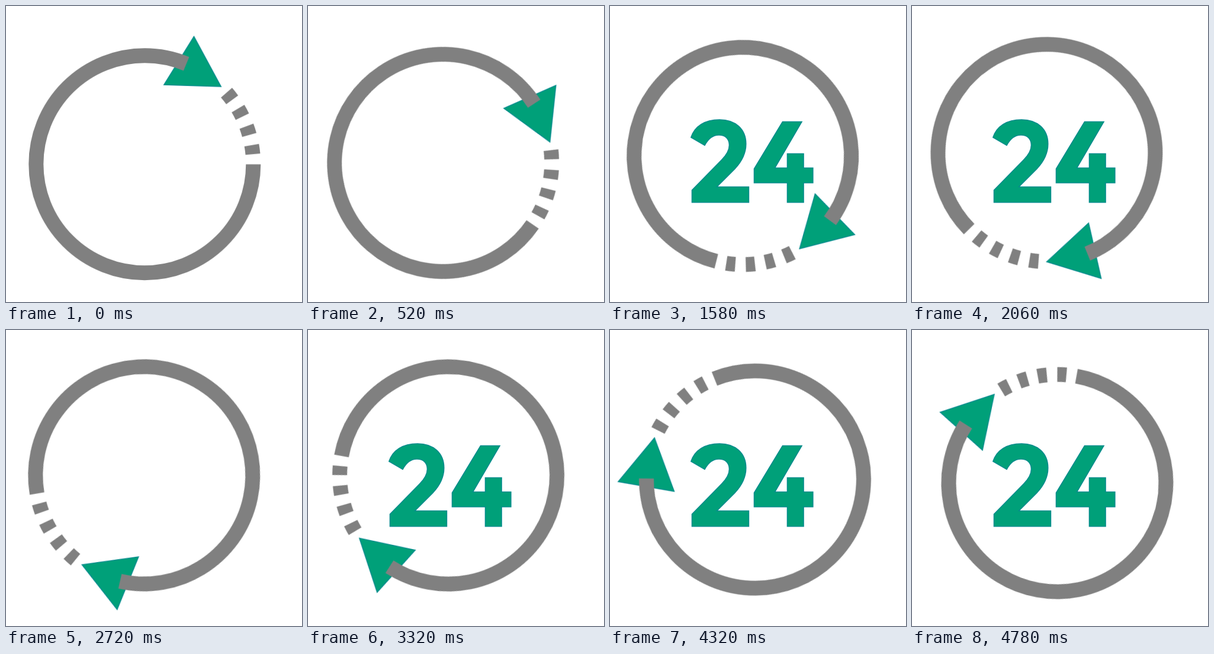
These frames come from a looping animation (500 px wide and 500 px high, 4800 ms). An HTML page:

```html
<!DOCTYPE html>
<html lang="en">
<head>
<meta charset="utf-8">
<title>24 hours</title>
<style>
  html, body {
    margin: 0;
    width: 100%;
    height: 100%;
    overflow: hidden;
    background: #fff;
  }
  svg {
    display: block;
    width: 100%;
    height: 100%;
  }
  .green {
    fill: #00a079;
    stroke: #058c8c;
    stroke-width: 1.6;
  }
  .ring {
    fill: none;
    stroke: #808080;
    stroke-width: 25;
    /* long arc, then four dashes, in degrees */
    stroke-dasharray: 292.5 26.3 4.8 5.55 4.8 5.55 4.8 5.55 4.8 5.35;
  }
  .dial {
    transform-origin: 234.7px 256.3px;
    animation: turn 4800ms linear infinite;
  }
  .digits {
    animation: blink 2400ms step-end infinite;
  }
  /* steady turn that slows down past the middle */
  @keyframes turn {
    0%      { transform: rotate(0deg); }
    10.833% { transform: rotate(34.4deg); }
    23.333% { transform: rotate(75.4deg); }
    33.75%  { transform: rotate(106.5deg); }
    42.917% { transform: rotate(135.4deg); }
    45%     { transform: rotate(142.8deg); }
    50.833% { transform: rotate(158.5deg); }
    56.667% { transform: rotate(170.3deg); }
    62.083% { transform: rotate(178.7deg); }
    67.5%   { transform: rotate(187deg); }
    73.958% { transform: rotate(199.7deg); }
    80.417% { transform: rotate(215.8deg); }
    90%     { transform: rotate(248deg); }
    99.583% { transform: rotate(280.1deg); }
    100%    { transform: rotate(281.5deg); }
  }
  @keyframes blink {
    0%      { visibility: hidden; }
    33.333% { visibility: visible; }
    100%    { visibility: visible; }
  }
</style>
</head>
<body>
<svg viewBox="0 0 500 500" role="img" aria-label="24">
  <g class="digits green">
    <path d="M138.5 331.7V311L188.5 260C197.5 251 201.5 244 201.5 235C201.5 224 194.5 218 184 218C173 218 166 224 160 235.5L136.8 222C143 203 160 192 185 192C212 192 229.7 208 229.7 233C229.7 247 225 260 211 275L180.5 305.5H234.4V331.7Z"/>
    <path d="M291.5 195.5H324L278.5 273.5H299.5V249.5H327V273.5H342.8V298.7H327V331.7H299.5V298.7H243.5V275Z"/>
  </g>
  <g class="dial">
    <path class="green" d="M317.3 51.5L266.8 133L363 136Z"/>
    <circle class="ring" cx="234.3" cy="267.2" r="183.5" pathLength="360"/>
  </g>
</svg>
</body>
</html>
```
